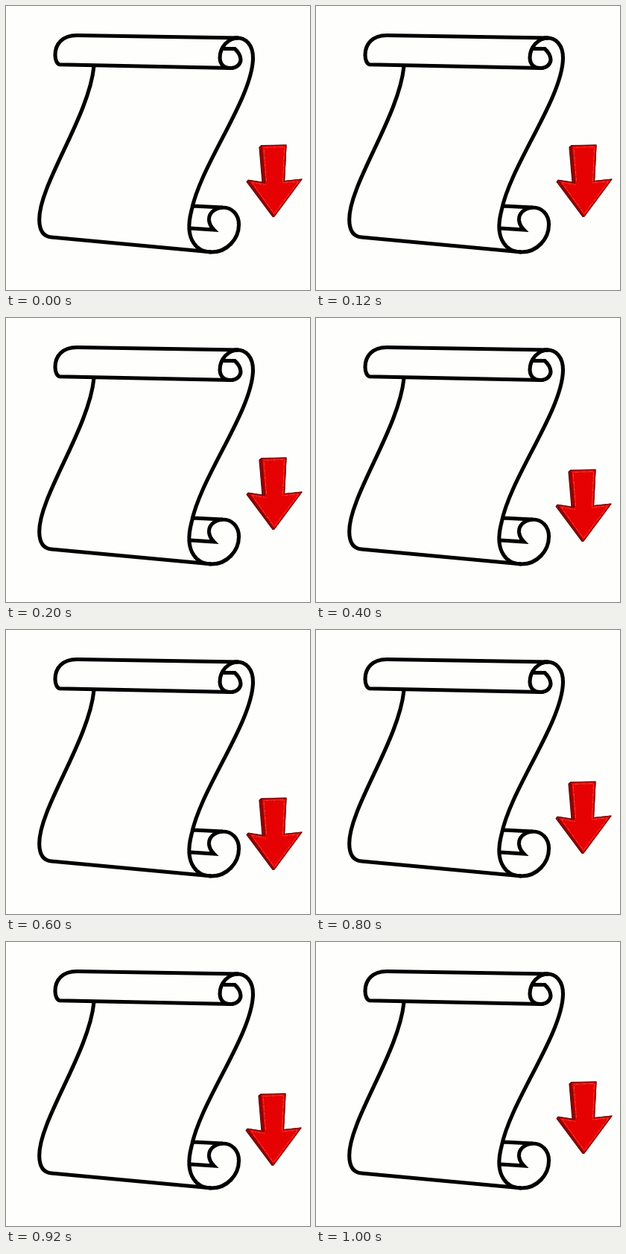
An HTML page for the animation above (1.2 s loop, 408 by 382 pixels).

```html
<!DOCTYPE html>
<html lang="en">
<head>
<meta charset="utf-8">
<title>Scroll down</title>
<style>
  html, body {
    margin: 0;
    width: 100%;
    height: 100%;
    overflow: hidden;
    background: #fefefc;
  }
  svg { display: block; width: 100%; height: 100%; }
  .paper {
    fill: none;
    stroke: #000;
    stroke-width: 5.1;
    stroke-linejoin: miter;
  }
  .arrow { animation: bob 1.2s step-end infinite; }
  .side { fill: #960404; stroke: #5c0808; }
  .face { fill: #e60202; stroke: #7a0606; }
  .side, .face { stroke-width: 1.2; stroke-linejoin: round; }
  .shine {
    fill: none;
    stroke: #f0564c;
    stroke-width: .8;
    stroke-dasharray: 5 1.5 2 1;
  }
  @keyframes bob {
    0%      { transform: translate(0, 0); }
    16.667% { transform: translate(0, 1px); }
    33.333% { transform: translate(-1px, 17px); }
    50%     { transform: translate(0, 39px); }
    66.667% { transform: translate(-1px, 17px); }
    83.333% { transform: translate(0, 1px); }
  }
</style>
</head>
<body>
<svg viewBox="0 0 408 382">
  <g class="paper">
    <!-- top roll -->
    <path d="M312 43 L96 39.500 C75 39 66 52 66 66 C66 73 68.500 78 72 78.700 L302 83.500"/>
    <path d="M312 43 C298 43 287 55 287 70 C287.500 79 293 83.500 301 83.500 C310 83.500 315 78 315 72 C314.500 66 311 61 307 57.500 L290 57.500"/>
    <!-- sheet edges -->
    <path d="M118 81 C111.500 148 44.500 240 44.700 287 C44.700 300 49 310 61 311 L276 331"/>
    <path d="M306 43 C323 41 332 54 331.500 71 C330 125 261 214 249 275 C244 294 245 309 252 319 C257 327 266 331 276 331 C297 331 312.500 313 312.500 294 C312.500 280 303 271 291 271 L251 269"/>
    <!-- bottom curl -->
    <path d="M291 271 C279 272 272 279 272.500 288 C273 294 276 298 279 301 L248 299"/>
  </g>
  <g class="arrow">
    <path class="side" d="M340 190 L343 187.500 L376 187 L373.500 235.500 L397 233 L360 283 L358 283.500 L323 236.500 L325 234 L344 237 Z"/>
    <path class="face" d="M343 188 L376 187 L373.500 235.500 L397 233 L360 283 L325.500 234.500 L347.500 238 Z"/>
    <path class="shine" d="M349.500 235.500 L346 190.500 L373.500 189.500 L371.500 238 L392.500 236 L360 279.500 L330 237.500 L349 240.500"/>
  </g>
</svg>
</body>
</html>
```
